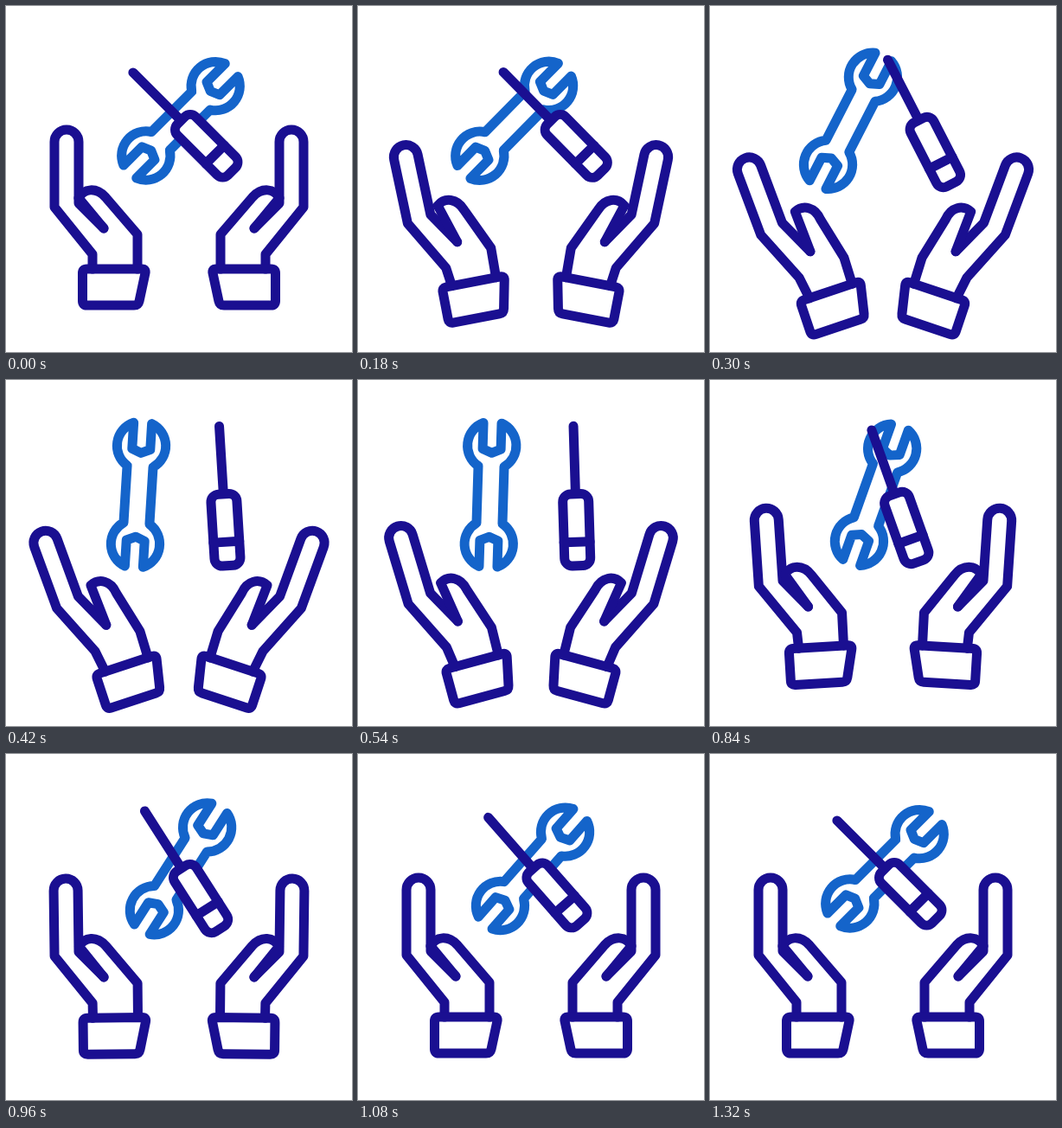
Recreate the animation shown at these times as an HTML page. Size 400 by 400 pixels, loop 1.35 s.

```html
<!DOCTYPE html>
<html lang="en">
<head>
<meta charset="utf-8">
<title>Hands and tools</title>
<style>
  html, body { margin: 0; width: 100%; height: 100%; overflow: hidden; background: #fff; }
  svg { display: block; width: 100%; height: 100%; }
  path, rect { fill: none; stroke: #1a0f91; stroke-width: 11; stroke-linecap: round; stroke-linejoin: round; }
  #wrench path { stroke: #1464ca; }
  #driver rect { fill: #fff; }
</style>
</head>
<body>
<svg viewBox="0 0 400 400">
  <g id="wrench">
    <path d="M-10.5 -83 A28.2 28.2 0 0 0 -15 -33 V33 A28.2 28.2 0 0 0 -10.5 83 V53 L0 48.5 L10.5 53 V83
             A28.2 28.2 0 0 0 15 33 V-33 A28.2 28.2 0 0 0 10.5 -83 V-53 L0 -48.5 L-10.5 -53 Z"/>
  </g>
  <g id="driver">
    <path d="M0 -80.5 V-2"/>
    <rect x="-15" y="-2" width="30" height="83" rx="9"/>
    <path d="M-15 53.5 H15"/>
  </g>
  <g id="hand"><path id="finger"/><path id="thumb"/><path id="cuff"/></g>
  <use href="#hand" transform="matrix(-1 0 0 1 400 0)"/>
</svg>
<script>
const LOOP = 1350, STEP = 30;
const $ = id => document.getElementById(id);

// Symmetric ease; a higher power gives softer ends and a faster middle.
function ease(t, from, to, power) {
  const k = Math.min(1, Math.max(0, (t - from) / (to - from)));
  return k ** power / (k ** power + (1 - k) ** power);
}
const outAndBack = (t, a, b, c, d, power) => ease(t, a, b, power) - ease(t, c, d, power);

// Returns a function that turns a point about a pivot and then shifts it.
function joint(px, py, degrees, dx, dy) {
  const a = degrees * Math.PI / 180, c = Math.cos(a), s = Math.sin(a);
  return (x, y) => [
    px + dx + (x - px) * c - (y - py) * s,
    py + dy + (x - px) * s + (y - py) * c
  ];
}

function rounded(pts, r) {
  const toward = (a, b) => {
    const f = r / Math.hypot(b[0] - a[0], b[1] - a[1]);
    return [a[0] + (b[0] - a[0]) * f, a[1] + (b[1] - a[1]) * f];
  };
  const n = pts.length;
  return pts.map((p, i) =>
    `${i ? 'L' : 'M'}${toward(p, pts[(i + n - 1) % n])}Q${p} ${toward(p, pts[(i + 1) % n])}`
  ).join('') + 'Z';
}

// The palm only sinks; finger, thumb and cuff also turn at their joints.
function drawHand(k) {
  const palm = joint(0, 0, 0, 3 * k, 27.5 * k);
  const finger = joint(70, 230, -21 * k, k, 28 * k);
  const thumb = joint(113, 257, 20 * k, k, 24 * k);
  const cuff = joint(123, 325, -19 * k, 21 * k, 26 * k);
  const crease = palm(113, 257);

  $('finger').setAttribute('d',
    `M${crease}L${finger(84, 228)}L${finger(84, 157)}A14 14 0 0 0 ${finger(56, 157)}` +
    `L${finger(56, 232.5)}L${palm(100, 287)}L${cuff(100, 304)}`);
  $('thumb').setAttribute('d',
    `M${crease}L${thumb(84, 222)}C${thumb(90, 211)} ${thumb(104, 209)} ${thumb(115, 221)}` +
    `L${palm(152, 264)}L${cuff(152, 304)}`);
  $('cuff').setAttribute('d',
    rounded([cuff(88.5, 304), cuff(162, 304), cuff(153, 346), cuff(88.5, 346)], 5));
}

function place(id, x, y, angle) {
  $(id).setAttribute('transform', `translate(${x} ${y}) rotate(${angle})`);
}

function draw(t) {
  const spread = outAndBack(t, 0, 330, 330, 1040, 1.6);
  const shift = outAndBack(t, 0, 400, 540, 950, 1.3);
  const turn = 45 - 43.5 * outAndBack(t, 150, 480, 485, 1260, 2);

  drawHand(spread);
  place('wrench', 202 - 49 * shift, 132.8, turn);
  place('driver', 203.8 + 47.7 * shift, 133.8, -turn);
}

const start = performance.now();
function tick() {
  const t = (performance.now() - start) % LOOP;
  draw(Math.floor(t / STEP) * STEP);
  requestAnimationFrame(tick);
}
tick();
</script>
</body>
</html>
```
